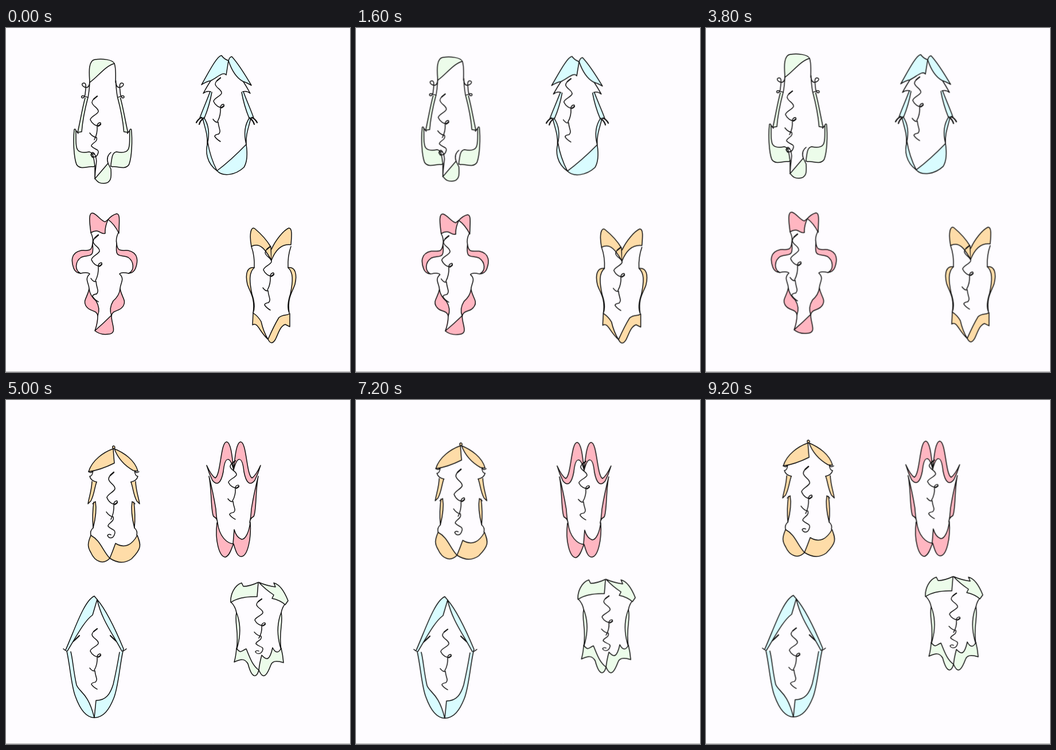
An HTML page for the animation above (9.3 s loop, 600x600 px).

```html
<!DOCTYPE html>
<html lang="en">
<head>
<meta charset="utf-8">
<title>Line creatures</title>
<style>
html, body { margin: 0; width: 100%; height: 100%; overflow: hidden; background: #fefcff; }
svg { display: block; width: 600px; height: 600px; stroke: #111; stroke-width: 1.5; stroke-linejoin: round; stroke-linecap: round; }
.green { fill: #ecfcea; }
.blue { fill: #d9fcff; }
.pink { fill: #ffb6c1; }
.orange { fill: #fedca8; }
.ink { fill: none; }
.bold { fill: none; stroke-width: 2.2; }
.scene { animation: first 9.3s step-end infinite; }
.scene + .scene { animation-name: second; }
.sway, .drift { transform-box: fill-box; transform-origin: center; animation: sway 9.3s linear infinite; }
.drift { animation-name: drift; }
.scene + .scene .drift { animation-name: drift-late; }
@keyframes first { 0% { visibility: visible } 43.01%, 100% { visibility: hidden } }
@keyframes second { 0% { visibility: hidden } 43.01%, 100% { visibility: visible } }
@keyframes sway {
  0%, 53.76% { transform: none }
  17.2% { transform: translate(1px, 1px) scale(1.02, .994) }
  43% { transform: translate(-1.6px, -1.8px) }
  43.01% { transform: translate(-1px, -1px) scale(1.03, 1) }
  66.67%, 87.1% { transform: translate(.8px, .9px) }
  100% { transform: translate(-1.8px, -1.5px) }
}
@keyframes drift { to { transform: translate(-20.6px, -21.9px) } }
@keyframes drift-late {
  0%, 43.01% { transform: translate(2.2px, 2.4px) }
  100% { transform: translate(-9.5px, -10.3px) }
}
</style>
</head>
<body>
<svg viewBox="0 0 600 600">
<defs>
  <g id="wave" class="ink">
    <path d="M0 0C-6 4 -9 7 -9 11C-8 18 3 20 2 27C0 32 -12 36 -12 41C-9 48 -2 53 4 51Q8 47 5 46Q0 47 0 52Q1 65 -5 76"/>
    <path class="bold" d="M-6 5L0 0M2 52L6 49"/>
  </g>
  <g id="plain">
    <use href="#wave"/>
    <path class="ink" d="M-13 72Q-8 79 -4 77C-3 90 2 92 -3 98Q-10 99 -10 102Q-7 107 0 111"/>
  </g>
  <g id="hook">
    <use href="#wave"/>
    <path class="ink" d="M-13 64Q-8 71 -1 72C2 80 -11 82 -10 87C-5 93 3 92 2 98C-1 110 -10 106 -11 102Q-9 99 -5 101"/>
  </g>
</defs>

<!-- Each creature: a left half, its mirror image, the uneven parts, the squiggle -->
<g class="scene">
  <g class="green drift">
    <g id="a">
      <path class="ink" d="M146 92C146 103 142 105 137 103S131 96 136 96S139 105 138 116C136 125 130 122 132 119S140 121 143 121Q145 112 146 95"/>
      <path d="M138 122C133 140 130 160 125 182L132 181Q134 155 143 121"/>
      <path d="M119 177C117 195 118 225 123 238C130 249 145 240 152 242L155 241C153 228 153 217 145 216C120 221 122 210 122 179Q121 175 119 177"/>
      <path class="ink" d="M122 179L126 184"/>
    </g>
    <use href="#a" transform="matrix(-1 0 0 1 337.6 0)"/>
    <path d="M146 95C145 78 143 57 155 55C168 53 186 55 189 62C175 65 160 85 146 95"/>
    <path d="M155 263L178 236Q181 242 183 246C184 260 184 271 170 271C160 271 159 266 155 263"/>
    <path class="ink" d="M189 62Q192 70 191 95M178 236Q174 224 183 217M155 240V263C156 235 160 235 156 223S145 220 151 226"/>
    <use href="#hook" x="159" y="119"/>
  </g>

  <g class="blue sway">
    <g id="b">
      <path d="M356 111C349 130 342 145 338 157L346 157Q355 135 359 112"/>
      <path d="M343 157C347 175 352 185 351 203Q358 175 345 156"/>
      <path class="ink" d="M357 92Q350 103 344 114Q350 109 357 111"/>
      <path class="bold" d="M341 156Q335 159 332 165M344 158Q339 161 337 168"/>
    </g>
    <use href="#b" transform="matrix(-1 0 0 1 770 0)"/>
    <path d="M341 99C352 80 368 48 376 48Q380 54 388 57L384 82C380 75 370 85 357 92Q350 93 341 99"/>
    <path d="M388 57Q390 50 394 50C405 62 418 83 428 100Q420 95 413 93C402 87 394 75 388 57"/>
    <path d="M352 200C347 215 350 236 368 249Q356 225 352 200"/>
    <path d="M368 249C378 260 400 257 415 243Q423 230 419 203Q392 231 368 249"/>
    <use href="#plain" x="374" y="87"/>
  </g>

  <g class="pink sway">
    <g id="c">
      <path d="M151 376C149 392 142 387 131 388C112 392 114 408 118 419Q121 427 130 428C119 422 121 407 131 400C145 394 154 404 151 376"/>
      <path d="M145 455C142 470 134 475 139 484C145 496 158 490 160 502Q165 489 157 476C150 470 146 463 145 455"/>
      <path class="ink" d="M148 357Q153 367 151 376M130 428Q143 425 146 429C136 438 145 445 145 455"/>
    </g>
    <use href="#c" transform="matrix(-1 0 0 1 344 0)"/>
    <path d="M148 357C145 335 144 321 152 323C160 326 166 337 173 338L178 334Q172 348 173 358C165 362 163 348 148 357"/>
    <path d="M178 334Q185 326 193 324C200 324 197 340 197 358Q189 342 178 334"/>
    <path d="M155 528Q165 536 178 534C196 533 183 516 184 501Q171 514 155 528Q160 515 160 502" />
    <use href="#plain" transform="translate(161 361) scale(1 1.05)"/>
  </g>

  <g class="orange sway">
    <g id="d">
      <path d="M433 418C420 416 417 430 421 447C425 460 435 470 431 497Q436 485 429 464C424 440 424 426 433 418"/>
      <path class="ink" d="M428 381Q434 398 433 418"/>
    </g>
    <use href="#d" transform="matrix(-1 0 0 1 925 0)"/>
    <path d="M428 381C424 360 427 345 434 350C446 360 455 370 462 382L463 405C455 392 445 372 428 381"/>
    <path d="M463 386C470 370 484 353 493 349C500 348 498 365 497 378Q475 375 463 405"/>
    <path d="M431 497L430 518C439 512 442 530 457 543Q449 530 445 512Q440 503 431 497"/>
    <path d="M457 543Q463 555 470 543C475 533 478 520 487 517L495 521V498C488 503 485 498 476 505Q468 518 457 543"/>
    <use href="#plain" x="461" y="381"/>
  </g>
</g>

<g class="scene">
  <g class="orange drift">
    <g id="e">
      <path d="M150 142C149 160 145 168 143 181L148 176C154 165 154 154 158 143"/>
      <path d="M153 178Q150 200 152 223Q159 195 156 177L151 181"/>
      <path class="ink" d="M144 125Q150 129 152 122Q151 133 146 133Q148 141 158 143M152 223Q146 228 148 236"/>
    </g>
    <use href="#e" transform="matrix(-1 0 0 1 376 0)"/>
    <path d="M187 85C170 91 150 105 144 125Q165 122 189 110Q188 100 187 85C183 80 190 78 190 83L187 86"/>
    <path d="M189 85C206 92 225 105 230 124L222 123C208 115 196 104 189 85"/>
    <path d="M148 236C142 250 142 256 148 266C155 282 170 288 181 276C168 262 165 245 148 236"/>
    <path d="M181 276C195 285 208 285 219 277C238 258 235 252 229 236C220 252 208 260 191 250Q186 264 181 276"/>
    <use href="#hook" transform="translate(188 126) scale(1 1.08)"/>
  </g>

  <g class="pink sway">
    <g id="f">
      <path d="M350 114C356 127 360 133 365 136C375 130 374 73 385 73C393 74 395 105 397 122C391 98 382 96 379 125C375 146 368 150 360 140Q354 128 350 114"/>
      <path d="M354 133C359 155 357 195 362 203Q369 207 369 214Q367 206 366 190Q361 160 354 133"/>
    </g>
    <use href="#f" transform="matrix(-1 0 0 1 794 0)"/>
    <path d="M368 214C364 245 372 274 383 274C392 270 394 255 397 251C385 250 372 238 369 214"/>
    <path d="M397 251C401 265 404 273 410 273C422 273 428 240 426 213C424 230 418 243 411 243Q402 240 398 226L396 251"/>
    <use href="#plain" transform="translate(400 106) scale(1 .92)"/>
  </g>

  <g class="blue sway">
    <g id="g">
      <path class="ink" d="M100 434Q103 437 107 438"/>
      <path class="bold" d="M125 395Q120 404 119 412M128 411Q121 418 116 422"/>
    </g>
    <use href="#g" transform="matrix(-1 0 0 1 310 0)"/>
    <path d="M104 436C120 400 136 350 154 342L159 348L151 375C137 385 124 410 107 438"/>
    <path d="M159 348C178 370 195 410 205 434L203 440C188 410 167 385 159 348"/>
    <path d="M106 438C112 465 114 500 121 517C130 542 141 554 154 554C143 510 128 510 123 497C117 470 117 455 113 439"/>
    <path d="M204 438C198 465 196 500 188 520C180 540 170 554 154 554L157 524C175 524 182 512 187 496Q193 470 198 440"/>
    <use href="#plain" transform="translate(159 399) scale(1 .95)"/>
  </g>

  <g class="green drift">
    <g id="h">
      <path d="M402 371C398 388 407 405 402 436Q411 408 406 384Q404 375 402 371"/>
      <path class="ink" d="M393 353Q400 360 402 371"/>
    </g>
    <use href="#h" transform="matrix(-1 0 0 1 882 0)"/>
    <path d="M440 318Q425 325 414 325L411 319C398 323 391 340 392 353Q408 342 438 343L440 318"/>
    <path d="M441 318Q455 324 470 326L467 319C480 322 488 340 492 350L487 357Q478 349 464 346L467 340Q452 330 441 318"/>
    <path d="M402 433Q401 447 398 457C410 452 416 450 422 460C430 490 438 482 441 471C429 462 425 448 419 434C412 436 410 444 402 433"/>
    <path d="M441 471C450 492 457 475 462 462C465 453 475 455 484 458Q483 445 480 433C473 446 467 436 465 432C460 454 455 455 446 445Q442 460 441 471"/>
    <use href="#hook" transform="translate(446 347) scale(1 .9)"/>
  </g>
</g>
<path d="M0 599.5H600" stroke="#aaa" stroke-width="1"/>
</svg>
</body>
</html>
```
